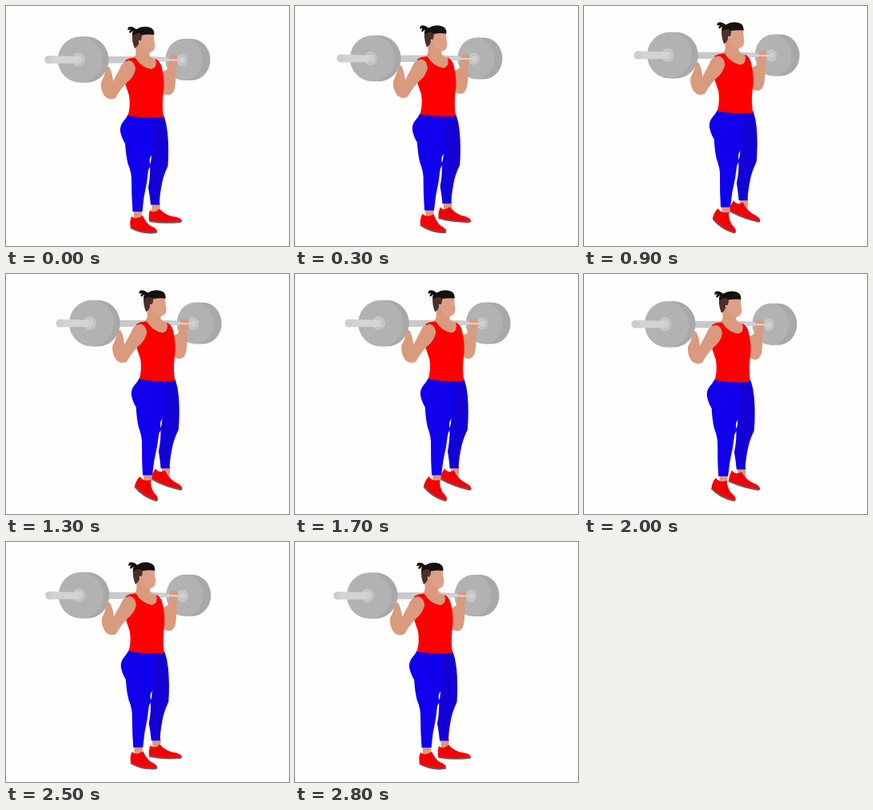
Write an HTML page that moves like this. It is 354x300 px and loops after 2900 ms.

```html
<!DOCTYPE html>
<html lang="en">
<head>
<meta charset="utf-8">
<title>Barbell calf raise</title>
<style>
  html, body { margin: 0; width: 100%; height: 100%; overflow: hidden; background: #fefefe; }
  svg { display: block; width: 354px; height: 300px; }
  .lift { transform: translate(calc(var(--p) * 14.2px), calc(var(--p) * -5.4px)); }
  .leg { transform-origin: 176px 137px; transform: translate(calc(var(--p) * 14.2px), calc(var(--p) * -5.4px)) skewX(calc(var(--p) * -.8deg)); }
  .near { transform-origin: 187px 284px; transform: rotate(calc(var(--p) * 23deg)); }
  .far { transform-origin: 219px 270px; transform: rotate(calc(var(--p) * 19deg)); }
  .skin { fill: #d99a7e; }
  .face { fill: #dda087; }
  .red { fill: #fe0000; }
  .shoe { fill: #f40006; }
  .sole { fill: none; stroke: #705858; stroke-width: 1.8; stroke-linecap: round; }
  .seam { fill: none; stroke: #c80000; stroke-width: 1; }
  .rim { fill: #a8a8a8; }
  .disc { fill: #b2b2b2; }
  .steel { fill: #c9c9cb; }
  .shine { fill: #d3d3d5; }
</style>
</head>
<body>
<svg id="stage" viewBox="0 0 354 300" style="--p:0">
  <!-- bar, far plate and far arm -->
  <g class="lift">
    <path class="rim" d="M223 41H232A23.500 26 0 0 1 232 93H223Z"/>
    <ellipse class="disc" cx="222.500" cy="67" rx="23" ry="26"/>
    <rect class="steel" x="120" y="63" width="48" height="8.500"/>
    <path class="steel" d="M180 63L220 65V70L180 69Z"/>
    <ellipse class="steel" cx="220" cy="67.500" rx="7" ry="7.500"/>
    <ellipse cx="220.500" cy="67.500" rx="4.200" ry="4.800" fill="#d0d0d2" stroke="#b7b7b9"/>
    <path class="skin" d="M203.500 63Q208 61 214 62.500Q216 68 212.500 76Q213 92 211 103Q209 111 203 111.500Q198 111 195 108L194 82Q200 82 203 77Z"/>
    <path class="shine" d="M190 65.500L219 66.500V69L190 68Z"/>
    <path class="skin" d="M204 63.500Q209 61 214 63V66.500L204 66Z"/>
  </g>

  <!-- far leg and shoe -->
  <path class="leg skin" d="M182 246H193L192 260H183Z"/>
  <g class="far">
    <path class="shoe" d="M180 255Q186 260 192 253.500Q199 261 208 263Q218 264 220 268L218 271Q198 272 179 268.500Q178 261 180 255Z"/>
    <path class="seam" d="M193 258L188 264M198 261L194 266"/>
    <path class="sole" d="M180 269Q200 272.500 219 269.500"/>
  </g>
  <path class="leg" fill="#1300d6" d="M176 137H197.500Q201 147 202 158Q204 178 202.500 200Q196 214 194.500 225Q192 238 192 248.500H181Q180 238 178 227Q181 211 180 199Q182 193 182 186L174 170Z"/>

  <!-- near leg and shoe -->
  <path class="leg skin" d="M159.500 253H170L170 265H160Z"/>
  <g class="near">
    <path class="shoe" d="M157 263Q163 268 171 262Q175 271 181 275Q189 278 189 282L187 284Q170 286 156 278Q154 270 157 263Z"/>
    <path class="seam" d="M173 267L167 273M177 272L171 278"/>
    <path class="sole" d="M156.500 277.500Q171 285 188 283"/>
  </g>
  <path class="leg" fill="#1000ec" d="M153 135Q150 141 147 144Q142 150 143 157Q145 166 149 172Q150 187 152.500 197Q157.500 209 157 220Q157 238 158.500 257H170.500Q172 238 176 221L178 205L181 199Q179 196 180 190Q185 183 185 171Q183 153 184 137Z"/>

  <!-- torso, head, near arm -->
  <g class="lift">
    <path class="skin" d="M162 45H184L182 57L179 59Q179 65 187 66L194 74L188 86H165L149 72L154 67Q163 64 162.500 58Z"/>
    <path class="face" d="M166 35H185L185.500 44L186.500 49L185.500 54Q184 58 179 57.500L174 56Q168 51 167 44Z"/>
    <path fill="#4b302a" d="M158 33Q157 44 161 53Q167 49 166 43Q170 46 170 35Z"/>
    <path fill="#171011" d="M163 29Q157 24 153 26.500L152 30L156 29.500Q153 32 155 34L159 31Q157 35 159 37Q164 32 170 36.500Q177 35 185.500 36Q186 28 179 26.500Q171 24 163 29Z"/>
    <path class="red" d="M149 68Q155 64 162 65Q169 77 182 79Q190 77 187 66Q194 69 195.500 80Q199 95 196.500 111Q195 124 197 139Q175 141 152.500 137Q156 125 154 112L148 94Q150 80 149 68Z"/>
    <path class="skin" d="M126 76Q123 88 119 95Q118 104 123 112Q129 119 137 115Q143 104 151 96Q160 89 162 79Q161 69 154 68Q145 69 142 79Q138 86 134 94Q133 83 129 76Z"/>
  </g>

  <!-- near plate and bar end -->
  <g class="lift">
    <path class="rim" d="M93 38.200H101A27.500 28.800 0 0 1 101 95.800H93Z"/>
    <ellipse class="disc" cx="92.800" cy="67" rx="28" ry="28.800"/>
    <ellipse class="steel" cx="90.500" cy="67" rx="8" ry="8.500"/>
    <ellipse cx="91" cy="67" rx="5.200" ry="6" fill="#cfcfd1" stroke="#b7b7b9"/>
    <path class="shine" d="M53 62L90 63V71.500L53 72Z"/>
    <ellipse cx="53" cy="67" rx="4.800" ry="5" fill="#cdcdcf"/>
  </g>
</svg>
<script>
  const LOOP = 2900, STEP = 100;
  const stage = document.getElementById('stage');
  const ease = (t, from, to) => {
    const u = Math.min(1, Math.max(0, (t - from) / (to - from)));
    return (1 - Math.cos(Math.PI * u)) / 2;
  };

  function draw() {
    const t = Math.floor(performance.now() % LOOP / STEP) * STEP;
    stage.style.setProperty('--p', ease(t, 0, 850) - ease(t, 1700, 2650));
    requestAnimationFrame(draw);
  }
  draw();
</script>
</body>
</html>
```
